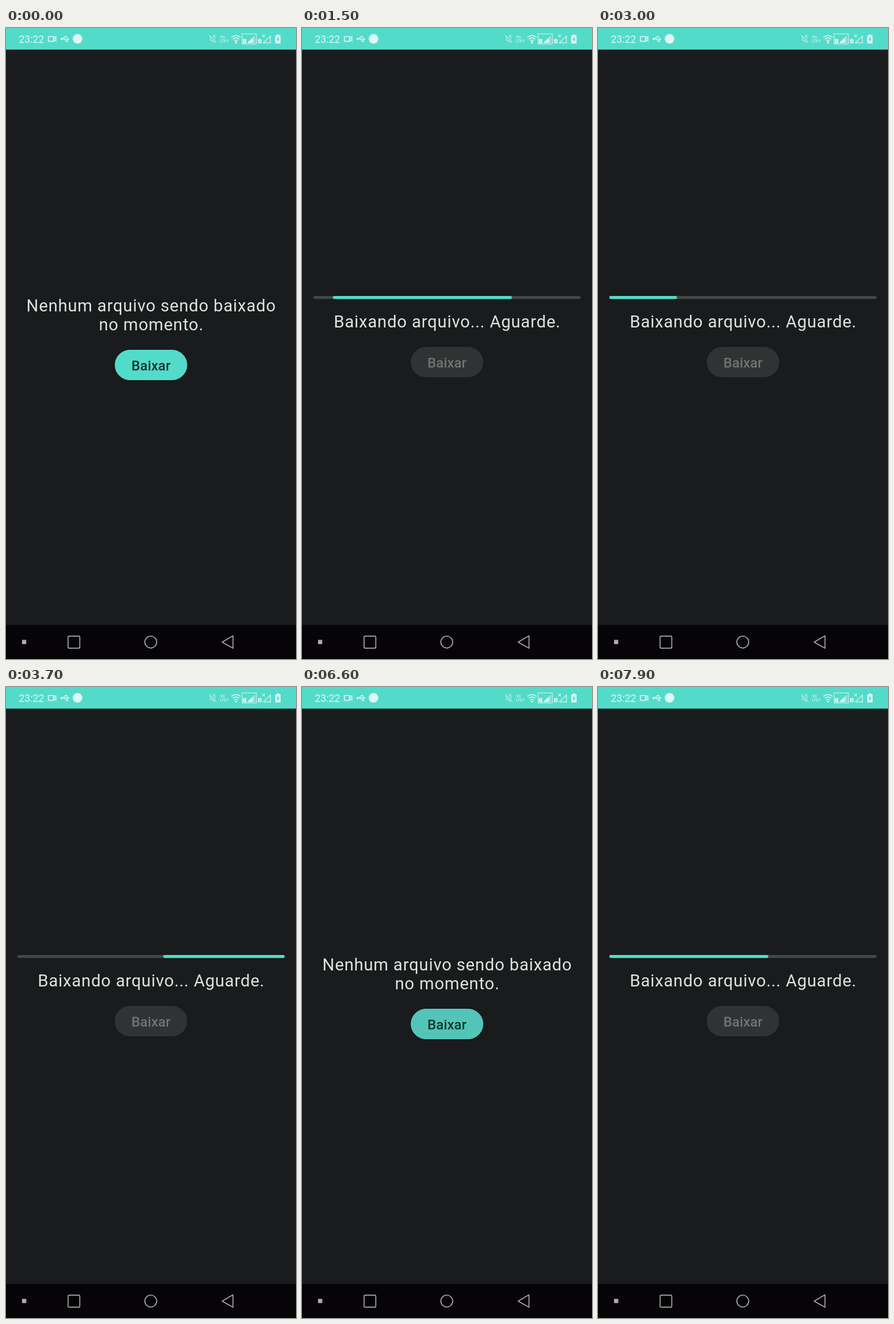
These frames come from a looping animation (508x1102 px, 8000 ms). An HTML page:

```html
<!DOCTYPE html>
<html lang="pt-BR">
<head>
<meta charset="utf-8">
<title>Download</title>
<style>
  html, body { margin: 0; width: 100%; height: 100%; overflow: hidden; background: #191b1c; }
  svg { display: block; width: 100%; height: 100%; }
  text { font-family: Roboto, sans-serif; }
  .message { font-size: 29.4px; letter-spacing: .86px; fill: #e1e3e2; text-anchor: middle; }
  .label { font-size: 24px; font-weight: 500; letter-spacing: .1px; text-anchor: middle; }
  .icons { fill: #dff8f4; }
  .line { fill: none; stroke: #dff8f4; stroke-width: 1.6; }
  .thin { stroke-width: 1.2; }
  .nav { fill: none; stroke: #aba9ac; stroke-width: 1.7; stroke-linejoin: round; }
  .bar { stroke: #53dbca; stroke-width: 5.3; stroke-linecap: round; }
  .track { stroke: #3f4947; }
</style>
</head>
<body>
<svg viewBox="0 0 508 1102">
  <rect width="508" height="1102" fill="#191b1c"/>
  <rect width="508" height="37.7" fill="#53dbca"/>

  <g class="icons">
    <text x="22.5" y="26" font-size="17.8">23:22</text>
    <path class="line" d="M74.3 14.8h9v8.6h-9zM83.8 18l3.6-2.6v7.4l-3.6-2.6"/>
    <path class="line thin" d="M97 19.2h11M100 19l3-3.6h2M102 19.4l3 3.6h2"/>
    <path d="M107 16.8l4.2 2.4-4.2 2.4zM104 14h2.6v2.6h-2.6zM106 21.8h2.6v2.6h-2.6z"/>
    <circle cx="97.5" cy="19.2" r="2"/>
    <circle cx="125.3" cy="19" r="8.4"/>

    <g opacity=".75">
      <path class="line thin" d="M356 13l12 12.5M358 16.5v5.5h3l4 3.5M362 15.5l3.6-3v8"/>
      <text x="375" y="18" font-size="7.2" font-weight="700">Vo</text>
      <text x="374.5" y="25.3" font-size="7.2" font-weight="700">LTE1</text>
    </g>
    <path class="line" d="M395 16.4q8-6.6 16 0M397.6 19.6q5.4-4.4 10.8 0M400.1 22.6q2.9-2.2 5.8 0"/>
    <circle cx="403" cy="25.2" r="1.7"/>
    <rect class="line" style="stroke-width:1" x="413.7" y="10.3" width="24.8" height="17.6"/>
    <path d="M415 19.5h6v7h-6zM422.5 26.2l9.5-9.5v9.5z"/>
    <path d="M432 16.7l4.2-4.2v13.7h-4.2z" opacity=".5"/>
    <path class="line thin" d="M451 25.8l12.3-12v12zM449 11.8l4.4 4.4M453.4 11.8l-4.4 4.4"/>
    <path d="M441.5 19.5h6v7h-6z"/>
    <g fill="#53dbca" font-size="6" font-weight="700">
      <text x="416.3" y="25.2">1</text>
      <text x="442.8" y="25.2">2</text>
    </g>
    <path d="M474 11.3h4.8v1.7h2.2v14h-9.4v-14h2.4z"/>
    <path d="M477.2 14.8l-3.6 5.6h2.2v4.4l3.4-5.8h-2z" fill="#53dbca"/>
  </g>

  <g id="idle">
    <text class="message" x="254.5" y="495">Nenhum arquivo sendo baixado</text>
    <text class="message" x="254.5" y="528.3">no momento.</text>
    <rect id="button" x="191" y="562.5" width="126" height="52" rx="26" stroke="#53dbca"/>
    <text class="label" x="254" y="598" fill="#0c332e">Baixar</text>
  </g>

  <g id="busy">
    <path class="bar track" d="M22.5 470.6H485.5"/>
    <path class="bar" id="first"/>
    <path class="bar" id="second"/>
    <text class="message" x="254.5" y="523">Baixando arquivo... Aguarde.</text>
    <rect x="190.5" y="557" width="127" height="53" rx="26.5" fill="#2f3333"/>
    <text class="label" x="254" y="593" fill="#727473">Baixar</text>
  </g>

  <g id="toast">
    <rect x="95" y="962.5" width="318" height="50" rx="25" fill="#08060a" stroke="#3b3a3c"/>
    <text x="254" y="994.3" font-size="17.65" fill="#fafafa" text-anchor="middle">Arquivo "???" baixado com sucesso!</text>
  </g>

  <rect y="1042.5" width="508" height="60" fill="#060407"/>
  <rect x="28" y="1068.5" width="7.5" height="7.5" rx="1" fill="#aba9ac"/>
  <g class="nav">
    <rect x="108.7" y="1062.2" width="20.6" height="20.9" rx="2"/>
    <circle cx="253.6" cy="1072.4" r="10.4"/>
    <path d="M378.6 1072.4L397.6 1061.6v21.6z"/>
  </g>
</svg>
<script>
const LOOP = 8000, STEP = 100, CYCLE = 1800;
const RUNS = [{ start: 980, end: 4200, freeze: 4000 }, { start: 6648, end: LOOP, freeze: LOOP }];
const TOAST = { enter: 4150, exit: 6100, fade: 500 };
const BAR = { x: 20, width: 468, cap: 2.5, y: 470.6 };

const $ = id => document.getElementById(id);
const clamp = (v, lo = 0, hi = 1) => Math.min(hi, Math.max(lo, v));
const show = (el, on) => el.setAttribute('display', on ? 'inline' : 'none');

// Cubic bezier easing with control points (x1, 0) and (x2, 1).
const ease = (x1, x2) => x => {
  if (x <= 0 || x >= 1) return clamp(x);
  let lo = 0, hi = 1;
  for (let i = 0; i < 24; i++) {
    const s = (lo + hi) / 2, r = 1 - s;
    if (3 * r * r * s * x1 + 3 * r * s * s * x2 + s ** 3 < x) lo = s; else hi = s;
  }
  return lo * lo * (3 - 2 * lo);
};
const edge = (delay, duration, curve) => phase => curve((phase - delay) / duration);

const SEGMENTS = [
  { el: $('first'), head: edge(0, 750, ease(.2, .8)), tail: edge(333, 850, ease(.4, 1)) },
  { el: $('second'), head: edge(1000, 567, ease(0, .65)), tail: edge(1267, 533, ease(.1, .45)) }
];

function drawBar(phase) {
  const place = f => BAR.x + clamp(f * BAR.width, BAR.cap, BAR.width - BAR.cap);
  for (const { el, head, tail } of SEGMENTS) {
    const a = tail(phase), b = head(phase);
    show(el, b - a > 1e-6);
    el.setAttribute('d', `M${place(a)} ${BAR.y}H${place(b) + .001}`);
  }
}

function toastAlpha(t) {
  const fadeIn = clamp((t - TOAST.enter) / TOAST.fade);
  const fadeOut = clamp((t - TOAST.exit) / TOAST.fade);
  return (1 - (1 - fadeIn) ** 2) * (1 - fadeOut ** 2);
}

function render(time) {
  // The screen refreshes ten times a second.
  const t = Math.floor((time % LOOP) / STEP) * STEP;
  const run = RUNS.find(r => t >= r.start && t < r.end);
  const pressed = RUNS.some(r => t < r.start && t >= r.start - STEP);
  show($('idle'), !run);
  show($('busy'), run);
  if (run) drawBar((Math.min(t, run.freeze) - run.start) % CYCLE);
  $('button').setAttribute('fill', pressed ? '#52c5b8' : '#53dbca');
  $('toast').setAttribute('opacity', toastAlpha(t));
}

const origin = performance.now();
function tick() {
  render(performance.now() - origin);
  requestAnimationFrame(tick);
}
tick();
</script>
</body>
</html>
```
